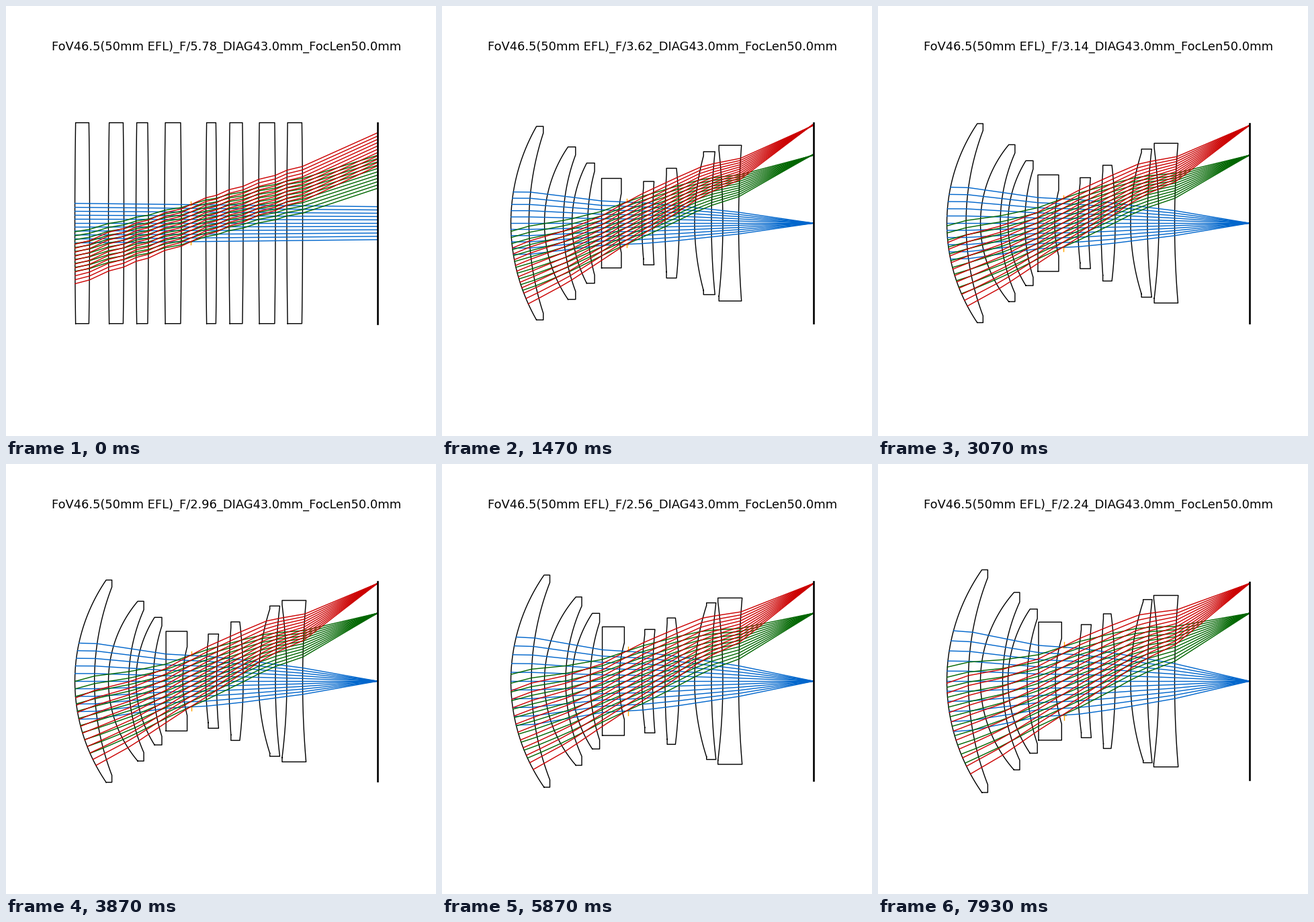
These frames come from a looping animation (640x640 px, 8 s). A matplotlib script:

```python
import numpy as np
import matplotlib.pyplot as plt
from matplotlib.animation import FuncAnimation

SIZE, DPI = 640, 128
FRAMES, LOOP = 120, 8000
MID_Y = 323.2
SENSOR_X = 553
PLATE = 149.5          # half height of the unshaped glass plates
MARGIN = 1.2           # glass height relative to the outermost ray
RAYS = 11

# Front vertex, rear vertex, front and rear curvature (1e-4 per pixel).
LENSES = np.array([
    (102.5, 124.5, 34.5, 23.5),
    (152.5, 175.5, 50, 35),
    (193.5, 212, 52, 34),
    (236, 261, 0, 45),
    (297.5, 313.5, 17, 11),
    (332, 353, 8, -12),
    (376, 401, 26, 9.5),
    (418, 441.5, -10, 6.5),
])
VERTEX = LENSES[:, :2].ravel()
CURVE = LENSES[:, 2:].ravel() * 1e-4
BULGE = np.tile([1e-4, -1e-4], 8)
DRIFT = np.array([0, 1, 0, 1, 0, 1, 0.3, 0.3] + [0] * 8)

# Colour and relative angle of each field.
FIELDS = [("#0066cc", 0), ("#006600", 0.695), ("#cc0000", 1)]

# Key points of the outermost chief ray and of the bundle half width.
CHIEF_X = [102.5, 186, 239, 274, 300, 390, 445, SENSOR_X]
CHIEF_Y = np.array([-78, -46, -20, 0, 14.5, 64, 81, 145.5])
HALF_X = [102.5, 130, 240, 300, 350, 442, SENSOR_X]
HALF_Y = np.array([75, 75, 53, 49, 42, 26, 0])

F_KEYS = [0, 12, 31, 46, 70, 88, 118]
F_NUM = [5.78, 3.9, 3.37, 3.14, 2.79, 2.56, 2.24]


def sag(y, k):
    return k * y ** 2 / (1 + np.sqrt(np.maximum(1 - (k * y) ** 2, 0)))


# Chief ray through flat plates: steep in air, shallow in glass.
PLATE_X = np.append(VERTEX, SENSOR_X)
PLATE_Y = np.append(0, np.cumsum(np.diff(PLATE_X) * np.tile([0.25, 0.46], 8)))
PLATE_Y -= np.interp(275, PLATE_X, PLATE_Y)


class Design:
    """The state of the lens at step t of the optimisation."""

    def __init__(self, t):
        self.t = t
        self.age = t / (FRAMES - 1)
        self.f_num = np.interp(t, F_KEYS, F_NUM)
        self.aper = F_NUM[-1] / self.f_num
        self.focus = 1 - (1 - min(t / 12, 1)) ** 2
        decay = np.exp(-t / 11)
        self.spill = 8 * decay * self.focus
        self.vertex = VERTEX + DRIFT * (4.5 * (1 - decay) + 5.5 * self.age)
        self.curve = (CURVE * (1 - decay) * (1.18 - 0.18 * self.age)
                      + BULGE * decay)

    def chief(self, x):
        front = 1.1 - 0.1 * self.age
        key = np.where(CHIEF_Y < 0, front, 1) * CHIEF_Y
        key[-1] += self.spill
        shaped = np.interp(x, CHIEF_X, key)
        flat = np.interp(x, PLATE_X, PLATE_Y)
        return flat + (shaped - flat) * self.focus

    def half(self, x, tilt=0):
        shaped = self.aper * np.interp(x, HALF_X, HALF_Y)
        shaped = shaped - self.spill * tilt * (x >= SENSOR_X)
        flat = self.aper * (76 - 0.028 * (x - VERTEX[0]))
        return flat + (shaped - flat) * self.focus

    def trace(self, tilt, u):
        """Points where a ray meets the surfaces and the sensor."""
        flat_x = np.append(self.vertex, SENSOR_X)
        k = np.append(self.curve, 0)
        x = flat_x
        for _ in range(8):
            y = tilt * self.chief(x) + u * self.half(x, tilt)
            x = flat_x + sag(y, k)
        return x, y


fig = plt.figure(figsize=(SIZE / DPI, SIZE / DPI), dpi=DPI, facecolor="white")
ax = fig.add_axes([0, 0, 1, 1])
ax.set_xlim(0, SIZE)
ax.set_ylim(SIZE, 0)
ax.axis("off")


def line(color, width):
    return ax.plot([], [], color=color, lw=width)[0]


lenses = [line("black", 0.8) for _ in LENSES]
stops = [(line("orange", 0.8), line("orange", 0.8)) for _ in range(2)]
bundles = [[line(color, 0.8) for _ in range(RAYS)] for color, _ in FIELDS]
sensor = line("black", 1.5)
title = ax.text(328, 66.1, "", ha="center", va="baseline",
                fontsize=10.05, family="DejaVu Sans")


def outline(vertex, curve, semi):
    """Closed contour of one element from its front and rear arcs."""
    steps = np.linspace(-1, 1, 61)
    top = max(semi)
    ya, yb = steps * semi[0], -steps * semi[1]
    xa = vertex[0] + sag(ya, curve[0])
    xb = vertex[1] + sag(yb, curve[1])
    x = np.concatenate([xa, [xa[-1], xb[0]], xb, [xb[-1], xa[0], xa[0]]])
    y = np.concatenate([ya, [top, top], yb, [-top, -top, ya[0]]])
    return x, y


def draw(t):
    d = Design(t)
    paths = [[d.trace(tilt, u) for u in np.linspace(-1, 1, RAYS)]
             for _, tilt in FIELDS]
    reach = np.max([np.abs(y) for rays in paths for _, y in rays], axis=0)
    semi = np.full(16, PLATE) if t == 0 else MARGIN * reach[:-1]
    half_sensor = PLATE - 0.02 * t

    # The view stays centred on everything drawn.
    low = max(semi[0], half_sensor)
    axis = MID_Y + (max(low, reach[-1]) - low) / 2

    for i, lens in enumerate(lenses):
        s = slice(2 * i, 2 * i + 2)
        x, y = outline(d.vertex[s], d.curve[s], semi[s])
        lens.set_data(x, axis - y)

    for bundle, rays in zip(bundles, paths):
        for ray, (x, y) in zip(bundle, rays):
            ray.set_data(x, axis - y)

    stop_x = 275 + 2.5 * d.age
    r = d.half(stop_x)
    for sign, (bar, post) in zip((1, -1), stops):
        y = axis - sign * r
        bar.set_data([stop_x - 0.05 * r, stop_x + 0.05 * r], [y, y])
        post.set_data([stop_x, stop_x], [y, y - sign * 0.15 * r])

    sensor.set_data([SENSOR_X] * 2, [axis - half_sensor, axis + half_sensor])
    title.set_text(f"FoV46.5(50mm EFL)_F/{round(float(d.f_num), 2)}"
                   "_DIAG43.0mm_FocLen50.0mm")
    return []


anim = FuncAnimation(fig, draw, frames=FRAMES, interval=LOOP / FRAMES,
                     init_func=lambda: draw(0), repeat=True, repeat_delay=0)
plt.show()
```
